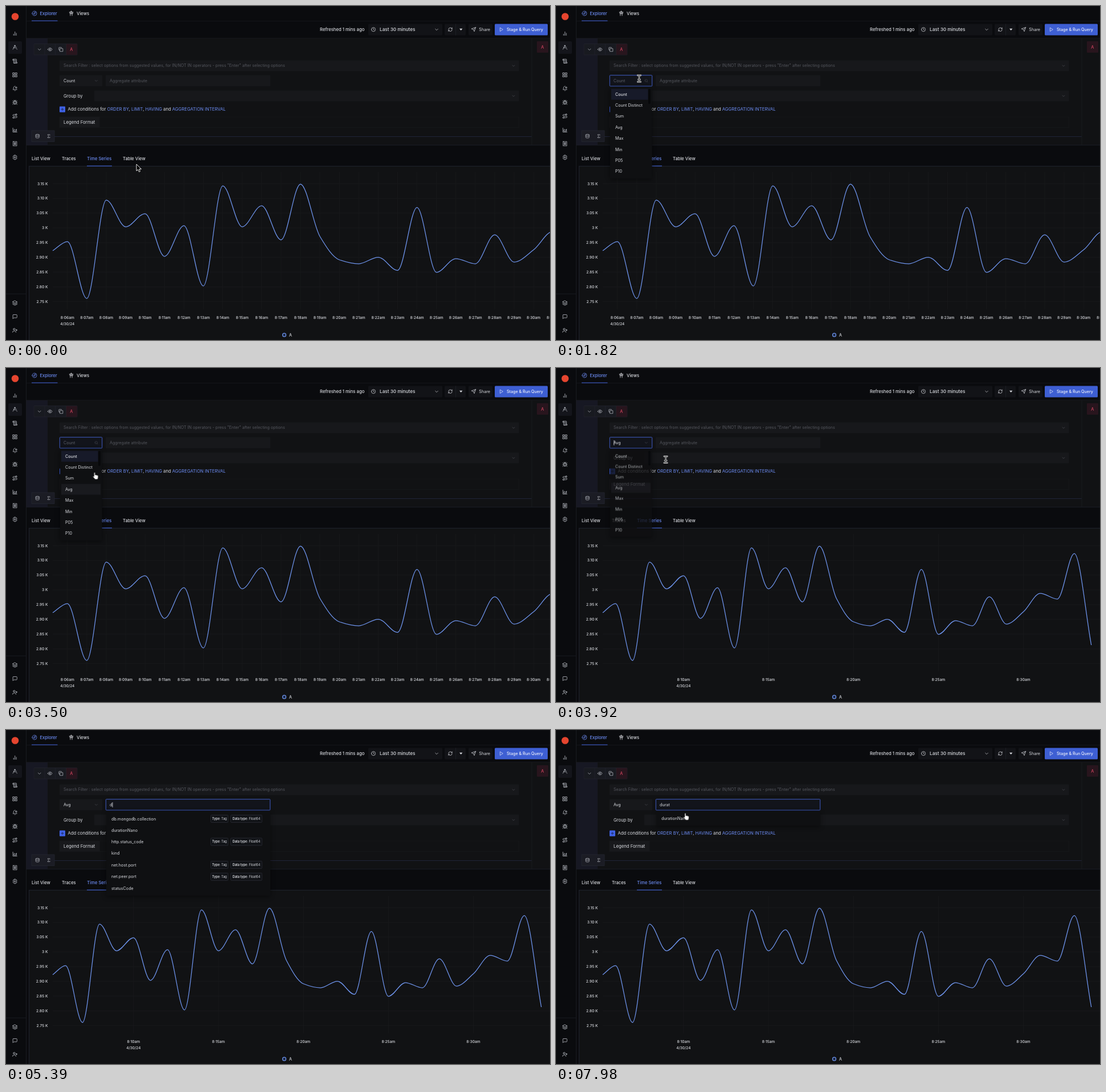
An HTML page that plays this animation: 955x587 px, repeating every 8000 ms.

```html
<!DOCTYPE html>
<html lang="en">
<head>
<meta charset="utf-8">
<title>Query explorer</title>
<style>
  html, body { margin: 0; width: 100%; height: 100%; overflow: hidden; background: #0a0b0e; }
  svg { display: block; width: 100vw; height: 100vh; }
  text { font-family: Inter, "Liberation Sans", sans-serif; white-space: pre; }
  .popup { transform-origin: 0 143px; }
  .popup > rect:first-child { filter: drop-shadow(0 2px 4px rgba(0, 0, 0, .45)); }
</style>
</head>
<body>
<svg id="stage" viewBox="0 0 955 587">
  <defs><clipPath id="list"><rect x="176" y="143" width="288" height="157"/></clipPath></defs>
</svg>
<script>
const LOOP = 8000;
const stage = document.getElementById('stage');
const WHITE = '#d9dbe0', DIM = '#54565d', BLUE = '#6d8df5', LINE = '#6f95ee', FIELD = '#17181b';

// ---- drawing helpers ----
let layer = stage;
function add(tag, attrs) {
  const node = document.createElementNS('http://www.w3.org/2000/svg', tag);
  for (const k in attrs) node.setAttribute(k, attrs[k]);
  return layer.appendChild(node);
}
function group(draw, attrs) {
  const parent = layer, g = add('g', attrs);
  layer = g;
  draw();
  layer = parent;
  return g;
}
const rect = (x, y, width, height, fill, more) => add('rect', { x, y, width, height, fill, ...more });
const line = (x1, y1, x2, y2, stroke, w = 1) => add('line', { x1, y1, x2, y2, stroke, 'stroke-width': w });
function text(x, y, str, size = 7.2, fill = WHITE, weight = 400, anchor = 'start') {
  const node = add('text', { x, y: y + size * .36, fill, 'font-size': size, 'font-weight': weight, 'text-anchor': anchor });
  node.textContent = str;
  return node;
}
const spans = (node, parts) => {
  node.textContent = '';
  for (const [str, attrs] of parts) {
    const s = document.createElementNS('http://www.w3.org/2000/svg', 'tspan');
    for (const k in attrs) s.setAttribute(k, attrs[k]);
    s.textContent = str;
    node.append(s);
  }
};
const ring = (x, y, r) => `M${x - r} ${y}a${r} ${r} 0 1 0 ${2 * r} 0a${r} ${r} 0 1 0 ${-2 * r} 0z`;
// icons live on a 24-unit grid, centred on x, y
const icon = (x, y, d, size = 9.5, stroke = '#c3c6ce', w = 2) => add('path', {
  d, fill: 'none', stroke, 'stroke-width': w, 'stroke-linecap': 'round', 'stroke-linejoin': 'round',
  transform: `translate(${x - size / 2} ${y - size / 2}) scale(${size / 24})`
});
const CHEVRON = 'm5 9 7 7 7-7';

// ---- timing helpers ----
const run = (node, frames) => node.animate(frames, { duration: LOOP, iterations: Infinity });
// times alternate on, off, on, off ...
function show(node, ...times) {
  const frames = [{ offset: 0, opacity: times[0] ? 0 : 1 }];
  times.forEach((ms, i) => { if (ms) frames.push({ offset: ms / LOOP, opacity: 1 - i % 2 }); });
  frames.push({ offset: 1, opacity: frames.at(-1).opacity });
  frames.forEach(f => f.easing = 'step-end');
  run(node, frames);
}
const OPEN = 'cubic-bezier(.23,1,.32,1)', CLOSE = 'cubic-bezier(.755,.05,.855,.06)';
function unfold(node, from, to) {
  const shut = { opacity: 0, transform: 'scaleY(.8)' }, full = { opacity: 1, transform: 'scaleY(1)' };
  const at = (ms, pose, easing = 'linear') => ({ offset: ms / LOOP, ...pose, easing });
  const frames = [at(0, shut), at(from, shut, OPEN), at(from + 200, full)];
  if (to) frames.push(at(to, full, CLOSE), at(to + 200, shut), at(LOOP, shut));
  else frames.push(at(LOOP, full));
  run(node, frames);
}

// ---- page shell ----
rect(0, 0, 955, 587, '#0a0b0e');
rect(36, 57, 919, 188, '#111214');
rect(36, 57, 37, 188, '#171823');
line(36, 56.5, 955, 56.5, '#15161a');
line(36, 26.5, 955, 26.5, '#14151a');
line(35.5, 0, 35.5, 587, '#191b21');
line(36, 244.5, 955, 244.5, '#191b24');
line(85, 229.5, 923, 229.5, '#202338');
line(923, 57, 923, 244, '#191a1f');

// ---- sidebar ----
add('circle', { cx: 16, cy: 18.5, r: 6.3, fill: '#e5452f' });
rect(4, 62, 24, 22, '#14151b', { rx: 2 });
const SIDE = [
  [48.5, 'M18 20V10M12 20V4M6 20v-6'],
  [72.5, ring(12, 5, 2) + 'M3 21l8-14.3M13 6.7l2 3.5M19 12c-3.9 4-10.1 4-14 0M21 21l-2.2-3.8'],
  [97, 'M15 12h-5M15 8h-5M19 17V5a2 2 0 0 0-2-2H4M8 21h12a2 2 0 0 0 2-2v-1a1 1 0 0 0-1-1H11a1 1 0 0 0-1 1v1a2 2 0 1 1-4 0V5a2 2 0 1 0-4 0v2a1 1 0 0 0 1 1h3'],
  [121, 'M3 3h7v7H3zM14 3h7v7h-7zM14 14h7v7h-7zM3 14h7v7H3z'],
  [145, 'M19.4 14.9C20.2 16.4 21 17 21 17H3s3-2 3-9c0-4 4-7 7.9-5.7M10.3 21a2 2 0 0 0 3.4 0' + ring(18, 8, 3)],
  [169.5, 'M8 2l2 2M14 4l2-2M9 7V6a3 3 0 1 1 6 0v1M12 20c-3.3 0-6-2.7-6-6v-3a4 4 0 0 1 4-4h4a4 4 0 0 1 4 4v3c0 3.3-2.7 6-6 6zM12 20v-9M6.5 9C4.6 8.8 3 7 3 5M6 13H2M3 21c0-2 1.7-4 3.8-4M21 5c0 2-1.6 3.8-3.5 4M22 13h-4M17.2 17c2 0 3.8 2 3.8 4'],
  [193.5, ring(6, 19, 3) + 'M9 19h8.5a3.5 3.5 0 0 0 0-7h-11a3.5 3.5 0 0 1 0-7H15' + ring(18, 5, 3)],
  [218, 'M3 3v18h18M7 12v5h12V8l-5 5-4-4z'],
  [242, 'M4 2v20l2-1 2 1 2-1 2 1 2-1 2 1 2-1 2 1V2l-2 1-2-1-2 1-2-1-2 1-2-1-2 1zM16 8h-6a2 2 0 1 0 0 4h4a2 2 0 1 1 0 4H8M12 17.5v-11'],
  [266, 'M10 2h4l1 3 3-.5 2.5 3.5-2 4 2 4-2.5 3.5-3-.5-1 3h-4l-1-3-3 .5L3.5 16l2-4-2-4L6 4.5 9 5z' + ring(12, 12, 3)],
  [522, 'M12 2l10 5-10 5L2 7zM2 12l10 5 10-5M2 17l10 5 10-5'],
  [546, 'M21 15a2 2 0 0 1-2 2H7l-4 4V5a2 2 0 0 1 2-2h14a2 2 0 0 1 2 2z'],
  [570, 'M16 21v-2a4 4 0 0 0-4-4H6a4 4 0 0 0-4 4v2' + ring(9, 7, 4) + 'M19 8v6M22 11h-6']
];
for (const [y, d] of SIDE) icon(15.7, y, d);
line(0, 506, 35, 506, '#191b21');

// ---- top bars ----
icon(50, 13, ring(12, 12, 10) + 'M16.2 7.8l-2.1 6.3-6.3 2.1 2.1-6.3z', 9.5, BLUE);
text(59.5, 13, 'Explorer', 7.6, BLUE, 500);
rect(45, 25.5, 45.5, 1, '#4466dd');
icon(114.5, 13, 'M18.2 12.3L20 6H4l1.8 6.3q.2.7 1 .7h10.4q.8 0 1-.7zM8 13v9M16 22v-9M9 6l1 7M15 6l-1 7M12 6V2M13 2h-2', 9.5, WHITE);
text(124, 13, 'Views', 7.6, WHITE, 500);

text(551, 41.3, 'Refreshed 1 mins ago', 7.7, WHITE, 500);
rect(636, 31.5, 130, 20, '#121317', { rx: 1.5 });
icon(645, 41.3, ring(12, 12, 10) + 'M12 6v6l4 2', 8.5, WHITE);
text(656, 41.3, 'Last 30 minutes', 8.2, WHITE, 500);
icon(756, 41.3, CHEVRON, 8, WHITE);
rect(770, 31.5, 37, 20, '#121317', { rx: 1.5 });
line(789.5, 31.5, 789.5, 51.5, '#1c1e25');
icon(780, 41.3, 'M3 12a9 9 0 0 1 9-9 9.8 9.8 0 0 1 6.7 2.7L21 8M21 3v5h-5M21 12a9 9 0 0 1-9 9 9.8 9.8 0 0 1-6.7-2.7L3 16M8 16H3v5', 8.5, WHITE);
add('path', { d: 'M796 39.8h5.4l-2.7 3.3z', fill: WHITE });
rect(812, 31.5, 42, 20, '#121317', { rx: 1.5 });
icon(821, 41.3, 'M22 2l-7 20-4-9-9-4zM22 2L11 13', 8.5, WHITE);
text(830.3, 41.3, 'Share');
rect(858, 31.5, 93, 20, '#3e5fd3', { rx: 1.5 });
icon(870, 41.3, 'M5 3l14 9-14 9z', 8, '#f0f2fa');
text(879, 41.3, 'Stage & Run Query', 7.1, '#f0f2fa', 500);

// ---- query builder ----
rect(49, 66.5, 76, 19.5, '#181a20', { stroke: '#23252e', 'stroke-width': .7, rx: 1 });
rect(105.5, 66.8, 19.3, 19, '#28151d');
for (const x of [68, 86.7, 105.3]) line(x, 66.5, x, 86, '#23252e', .7);
icon(58.7, 76.3, CHEVRON, 8);
icon(77.2, 76.3, 'M2 12s3-7 10-7 10 7 10 7-3 7-10 7-10-7-10-7z' + ring(12, 12, 3), 9);
icon(96.3, 76.3, 'M8 8h14v14H8zM4 16q-2 0-2-2V4q0-2 2-2h10q2 0 2 2', 8.5);
text(114.8, 76.4, 'A', 7.2, '#d2455f', 500, 'middle');
rect(932, 62, 20, 20, '#28151d', { rx: 1 });
text(941.8, 72, 'A', 7.2, '#d2455f', 500, 'middle');

rect(94, 95.5, 806.5, 19, FIELD, { rx: 1 });
text(101, 104.8, 'Search Filter : select options from suggested values, for IN/NOT IN operators - press "Enter" after selecting options', 7.15, DIM);
icon(891, 105, CHEVRON, 7, '#55575e');
rect(94, 121.5, 75, 19.5, FIELD, { rx: 1 });
rect(175, 121.5, 289, 19.5, FIELD, { rx: 1 });
text(101, 158, 'Group by', 7.72);
rect(155, 148.5, 745.5, 19, FIELD, { rx: 1 });
icon(891, 158, CHEVRON, 7, '#55575e');
rect(94, 176.5, 10, 10.3, '#3f62e6', { rx: 1 });
icon(99, 181.6, 'M12 5v14M5 12h14', 7.5, '#111522');
const key = { fill: BLUE };
spans(text(108.5, 181.4, '', 7.7), [
  ['Add conditions for '], ['ORDER BY', key], [', '], ['LIMIT', key], [', '],
  ['HAVING', key], [' and '], ['AGGREGATION INTERVAL', key]
]);
rect(94, 195, 806.5, 18.5, 'none', { stroke: '#17181b', 'stroke-width': .8 });
rect(94, 195, 70.5, 18.5, '#18191c');
text(101, 204.3, 'Legend Format', 7.75);
rect(45, 219, 40, 19.5, '#1b1c24', { stroke: '#262833', 'stroke-width': .7 });
icon(55.2, 228.7, 'M3 5c0 4 18 4 18 0s-18-4-18 0v14c0 4 18 4 18 0V5M3 12c0 4 18 4 18 0', 8);
icon(75, 228.7, 'M18 7V4H6l6 8-6 8h12v-3', 8);

// ---- result tabs ----
text(45, 268, 'List View', 7.6, WHITE, 500);
text(98, 268, 'Traces', 7.6, WHITE, 500);
text(142.3, 268, 'Time Series', 7.6, BLUE, 500);
text(205, 268, 'Table View', 7.6, WHITE, 500);

// ---- chart ----
rect(40.5, 281.5, 930, 320, '#111214', { stroke: '#1e222c' });
rect(142, 280.6, 44, 1.1, '#4466dd');
const LEVELS = [430, 414, 514, 341, 388, 365, 440, 386, 492, 316, 388, 351, 411, 313, 405, 446,
  453, 441.5, 464.5, 354, 468, 444, 453, 402, 450, 428.5, 396, 406, 326, 487];
const rowY = i => 312.2 + i * 25.92;
for (let i = 0; i < 9; i++) {
  const v = 3.15 - i * .05;
  line(82, rowY(i), 955, rowY(i), '#18191b');
  text(73.5, rowY(i), (Math.abs(v - 3) < .01 ? '3' : v.toFixed(2)) + ' K', 6.6, WHITE, 500, 'end');
}
// monotone cubic through the points
function spline(xs, ys) {
  const n = xs.length, dx = [], slope = [];
  for (let i = 0; i < n - 1; i++) {
    dx[i] = xs[i + 1] - xs[i];
    slope[i] = (ys[i + 1] - ys[i]) / dx[i];
  }
  const m = xs.map((_, i) => {
    if (i === 0) return slope[0];
    if (i === n - 1) return slope[n - 2];
    const a = slope[i - 1], b = slope[i], p = dx[i - 1], q = dx[i];
    return a * b <= 0 ? 0 : 3 * (p + q) / ((2 * q + p) / a + (q + 2 * p) / b);
  });
  let d = `M${xs[0]} ${ys[0]}`;
  for (let i = 0; i < n - 1; i++) {
    const h = dx[i] / 3;
    d += `C${xs[i] + h} ${ys[i] + m[i] * h} ${xs[i + 1] - h} ${ys[i + 1] - m[i + 1] * h} ${xs[i + 1]} ${ys[i + 1]}`;
  }
  return d;
}
function chart(step, first, every) {
  return group(() => {
    const minuteX = k => 82 + (k + .755) * step;
    for (let k = first; k < 26; k += every) {
      const x = minuteX(k);
      line(x, 292, x, 533, '#18191b');
      text(x, 548, `8:${String(6 + k).padStart(2, '0')}am`, 6.6, WHITE, 500, 'middle');
    }
    text(minuteX(first), 558.5, '4/30/24', 6.4, WHITE, 500, 'middle');
    const xs = LEVELS.map((_, i) => i ? minuteX(i - 1) : 82);
    add('path', { d: spline(xs, LEVELS), fill: 'none', stroke: LINE, 'stroke-width': 1.25 });
  });
}
const PICKED = 3640;
show(chart(34.1, 0, 1), 0, PICKED);
show(chart(29.83, 4, 5), PICKED);
add('circle', { cx: 488.5, cy: 578.2, r: 3, fill: '#17233f', stroke: LINE, 'stroke-width': 1.2 });
text(497, 578.3, 'A', 6.9, WHITE, 500);

// ---- operator select ----
const focusBox = (x, w) => rect(x, 121.7, w, 19.2, '#12141b', { rx: 1, stroke: '#3f5cc4', 'stroke-width': 1 });
show(focusBox(94.3, 74.4), 1540, 3990);
show(text(101, 131.3, 'Count'), 0, 1540);
show(text(101, 131.3, 'Count', 7.2, '#5d6069'), 1540, PICKED);
show(text(101, 131.3, 'Avg'), PICKED);
show(rect(101.5, 127, .8, 9, WHITE), PICKED, 3990);
show(icon(158.5, 131.3, CHEVRON, 7, '#55575e'), 0, 1540, PICKED);
show(icon(158.5, 131.3, ring(11, 11, 8) + 'M21 21l-4.3-4.3', 6.5, '#55575e'), 1540, PICKED);

// ---- attribute input ----
show(focusBox(175.3, 288.4), 4400);
show(text(182, 131.3, 'Aggregate attribute', 7.2, DIM), 0, 5320);
const caret = x => rect(x, 127, .8, 9, WHITE);
show(caret(182), 4400, 4970);
const KEYS = [5320, 5600, 5810, 5880, 6090];
KEYS.forEach((ms, i) => {
  const typed = text(182, 131.3, 'durat'.slice(0, i + 1));
  const bar = caret(182.2 + typed.getComputedTextLength());
  const next = KEYS[i + 1];
  if (next) {
    show(typed, ms, next);
    show(bar, ms, next);
  } else {
    show(typed, ms);
    show(bar, ms, 6650, 7140, 7700);
  }
});

// ---- popups ----
const popup = (x, w, h, draw) => group(() => {
  rect(x, 143, w, h, '#0f1012', { rx: 1.5 });
  draw();
}, { class: 'popup' });

const operators = popup(95, 73.5, 160, () => {
  show(rect(97, 145.7, 64.5, 19, '#171a29'), 0, PICKED);
  show(rect(97, 203.7, 69, 19, '#191a1e'), 2800);
  rect(162, 146, 4, 26, '#07080a', { rx: 2 });
  ['Count', 'Count Distinct', 'Sum', 'Avg', 'Max', 'Min', 'P05', 'P10'].forEach((name, i) =>
    text(104, 155.2 + i * 19.35, name, 7.2, WHITE, i ? 400 : 500));
});
unfold(operators, 1600, 3770);

const TAG_WIDTH = { Tag: 31, Resource: 46.5, String: 51, Float64: 55.5 };
function tag(right, y, label, value) {
  const w = TAG_WIDTH[value], x = right - w;
  rect(x + .4, y - 6.5, w - .8, 13, '#111317', { rx: 1, stroke: '#2b2e37', 'stroke-width': .8 });
  spans(text(x + w / 2, y, '', 5.5, WHITE, 400, 'middle'), [[label + ': ', { 'font-weight': 600 }], [value]]);
  return x - 4;
}
// rows: name, then tag type and data type when present
function rows(list) {
  let top = 145.6;
  for (const [name, type, data] of list) {
    const h = type ? 20.9 : 19.6, y = top + h / 2 - .1;
    text(185, y, name);
    if (type) tag(tag(449.7, y, 'Data type', data), y, 'Type', type);
    top += h;
  }
}
const MONGO = 'db.mongodb.collection';
const everything = popup(176, 288, 160, () => {
  rect(178, 146, 278, 19, '#141518');
  rect(457.5, 146.5, 4.5, 11.5, '#07080a', { rx: 2 });
  group(() => rows([
    ['parentSpanID'], ['client-uuid', 'Resource', 'String'], ['component'], ['component', 'Tag', 'String'],
    [MONGO, 'Tag', 'String'], [MONGO, 'Tag', 'Float64'], ['db.name', 'Tag', 'String'], ['db.statement', 'Tag', 'String']
  ]), { 'clip-path': 'url(#list)' });
});
const full = group(() => layer.append(everything));
unfold(everything, 4400);
show(full, 4400, 4620);

show(popup(176, 288, 148, () => rows([
  [MONGO, 'Tag', 'Float64'], ['durationNano'], ['http.status_code', 'Tag', 'Float64'], ['kind'],
  ['net.host.port', 'Tag', 'Float64'], ['net.peer.port', 'Tag', 'Float64'], ['statusCode']
])), 4620, 7140);
show(popup(176, 288, 25, () => rows([['durationNano']])), 7140);

// ---- pointer ----
const pointer = group(() => {
  const shape = (d, fill, stroke, w, more) => add('path', { d, fill, stroke, 'stroke-width': w, 'stroke-linejoin': 'round', ...more });
  show(shape('M0 0V11.8L2.7 9.4 4.5 13.5 6.5 12.6 4.8 8.6H8.5Z', '#000', '#fff', .9), 0, 100, 420, 700);
  show(shape('M2.8 7.6V1.4a1.1 1.1 0 0 1 2.2 0V5c.4-.8 1.6-.6 1.8.2.5-.6 1.6-.4 1.8.4.6-.4 1.6 0 1.6.8V9c0 2-.9 2.6-1.2 3.7H4.6C4.2 11.4 2.4 10 1 8.2.4 7.2 1.6 6.4 2.8 7.6z',
    '#fff', '#000', .8, { transform: 'translate(-3.9 -.3)' }), 100, 420, 980, 1540, 2590, PICKED, 7975);
  show(group(() => {
    const beam = 'M-2.6 -5.8Q-.2 -5.8 0 -4.4Q.2 -5.8 2.6 -5.8M0 -4.4V4.4M-2.6 5.8Q-.2 5.8 0 4.4Q.2 5.8 2.6 5.8M-1.5 1.6H1.5';
    shape(beam, 'none', '#fff', 2.4, { 'stroke-linecap': 'round' });
    shape(beam, 'none', '#000', .9);
  }), 700, 980, 1540, 2590, PICKED, 5320);
});
const PATH = [
  [0, 229, 278], [70, 229, 278], [140, 229, 266], [350, 229, 266], [560, 190, 190], [770, 140, 106],
  [910, 124, 94], [1120, 146, 127.5], [2100, 146, 127.5], [2450, 145.5, 128.5], [2870, 129, 201],
  [3010, 129, 202], [3150, 129, 202], [3640, 166, 176], [3920, 192.5, 161], [4340, 226, 139],
  [4550, 227, 137], [5320, 227, 137], [5400, 227, 146], [LOOP, 227, 146]
];
run(pointer, PATH.map(([ms, x, y]) => ({ offset: ms / LOOP, transform: `translate(${x}px, ${y}px)` })));
</script>
</body>
</html>
```
